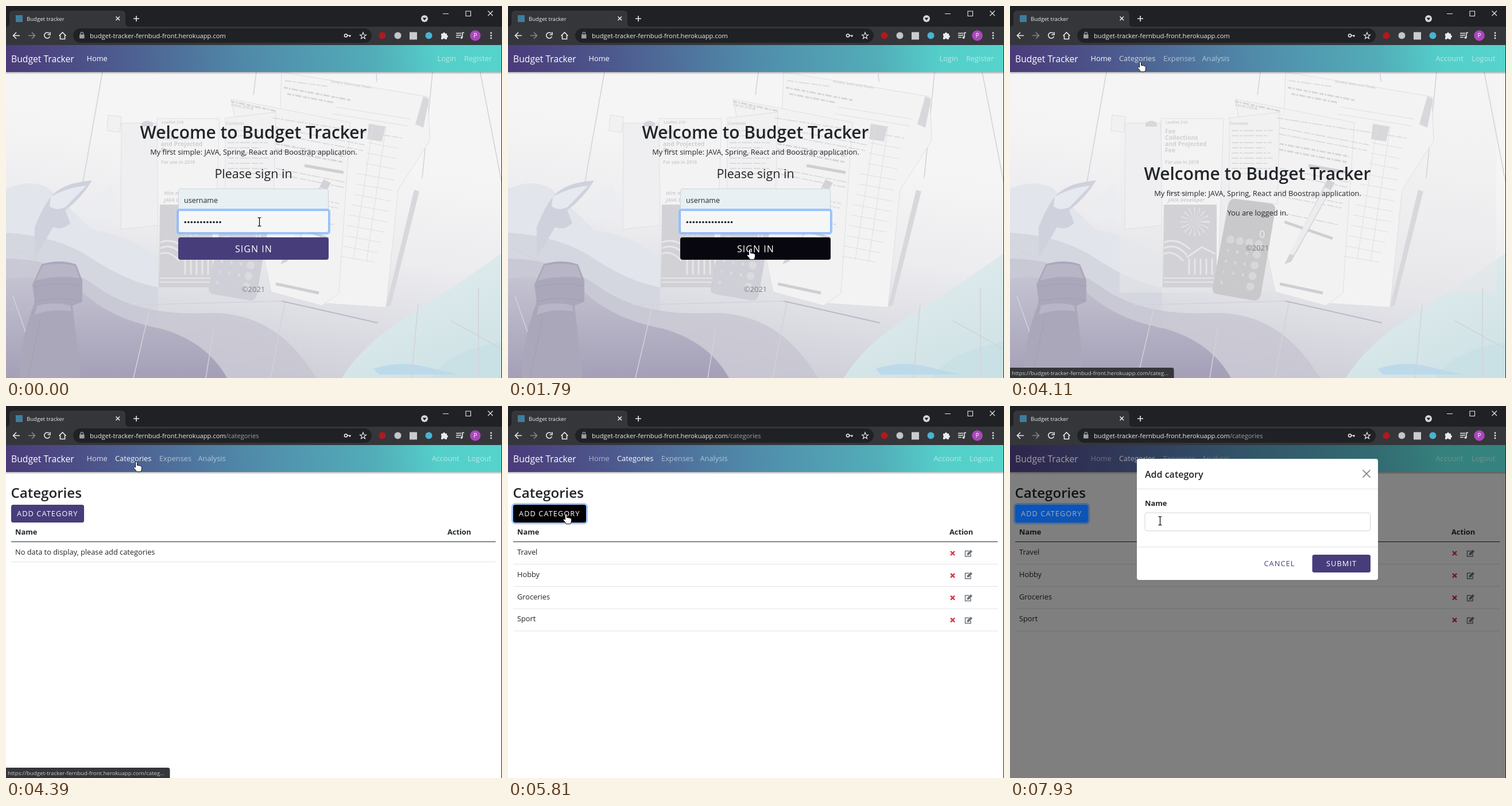
Write an HTML page that moves like this. It is 864x648 px and loops after 8000 ms.

```html
<!DOCTYPE html>
<html lang="en">
<head>
<meta charset="utf-8">
<title>Budget tracker</title>
<style>
html, body { margin: 0; width: 100%; height: 100%; overflow: hidden; background: #fff; }
svg { display: block; width: 864px; height: 648px; }
text { font: 12.8px "Open Sans", "Noto Sans", sans-serif; fill: #212529; white-space: pre; }
.mid { text-anchor: middle; }
.h1 { font-size: 29.9px; font-weight: 600; }
.h2 { font-size: 24.1px; font-weight: 600; }
.h3 { font-size: 21.5px; }
.h5 { font-size: 16px; font-weight: 600; }
.th { font-weight: 700; }
.btn { letter-spacing: 1.05px; fill: #fff; }
.nav text { fill: #fff; }
.dim { fill-opacity: .55; }
.copy { font-size: 13px; fill: #7b8087; }
.ui { fill: none; stroke: #e8eaed; stroke-width: 1.6; }
.print text { fill: #d0d0d3; font-weight: 700; }
.ring { fill: none; stroke: #86b7fe; stroke-width: 3; stroke-opacity: .75; }
</style>
</head>
<body>
<svg viewBox="0 0 864 648">
<defs>
  <linearGradient id="bar" gradientUnits="userSpaceOnUse" x1="0" y1="115" x2="846" y2="7">
    <stop offset="0" stop-color="#4a3a79"/><stop offset=".22" stop-color="#4d5a8e"/>
    <stop offset=".5" stop-color="#508baa"/><stop offset=".75" stop-color="#52adb8"/>
    <stop offset=".88" stop-color="#54cfca"/><stop offset="1" stop-color="#55d3cc"/>
  </linearGradient>
  <linearGradient id="desk" gradientUnits="userSpaceOnUse" x1="480" y1="250" x2="420" y2="660">
    <stop offset="0" stop-color="#f5f5f5"/><stop offset=".4" stop-color="#ececef"/>
    <stop offset=".7" stop-color="#dcdde3"/><stop offset="1" stop-color="#cbcbd5"/>
  </linearGradient>
  <linearGradient id="shade" x2="0" y2="1">
    <stop offset="0" stop-color="#c4c3d1"/><stop offset="1" stop-color="#a49fb7"/>
  </linearGradient>
  <linearGradient id="teal" x2=".5" y2="1">
    <stop offset="0" stop-color="#e6eef0"/><stop offset="1" stop-color="#d0e3e6"/>
  </linearGradient>
  <linearGradient id="pale" x2="0" y2="1">
    <stop offset="0" stop-color="#f5f5f5"/><stop offset="1" stop-color="#e6e6e9"/>
  </linearGradient>
  <linearGradient id="drop" x2="0" y2="1">
    <stop offset="0" stop-opacity=".28"/><stop offset="1" stop-opacity="0"/>
  </linearGradient>
</defs>

<g id="photo">
  <path fill="url(#desk)" d="M0 68H864V648H0Z"/>
  <path fill="#e2e5eb" d="M0 318Q45 300 75 318L150 390Q220 400 265 440V520H0Z"/>
  <path fill="#d5d7e0" d="M0 395Q90 400 150 440T265 490V560H0Z"/>
  <path fill="#c5c4d1" fill-opacity=".7" d="M0 440Q90 440 160 490T350 535T540 648H0Z"/>
  <path fill="url(#shade)" d="M0 475Q60 465 130 495Q180 545 270 562Q350 585 385 648H0Z"/>
  <path fill="url(#teal)" d="M585 648Q620 590 700 540T864 430V648Z"/>
  <path fill="#c9e1e4" d="M740 648Q770 600 864 585V648Z"/>
  <path fill="#bcdaea" d="M640 632Q690 615 745 632L790 642H650Z"/>
  <path id="wash" fill="url(#pale)" fill-opacity=".6" d="M191 115H847V499H191Z"/>
  <path fill="none" stroke="#d2d2d9" stroke-width="1.5" d="M168 115L130 330M436 115L431 155M645 118L646 132M743 115L725 300M826 115L864 310M252 520L222 648M362 560L348 648M486 515L461 648M718 520L706 648M215 521L480 514L648 552M0 418L56 445M12 505L40 585M775 548L864 598M823 490V648"/>
  <path stroke="#bbbac6" stroke-width="2" d="M480 514L648 552"/>
  <g stroke="#dfdfe2">
    <path fill="#f3f3f3" d="M480 115L735 158L738 235L683 320L662 525L555 518L467 480Z"/>
    <path fill="#f2f2f3" d="M392 162L600 203L580 500L550 522L462 498Z"/>
    <path fill="#f1f1f2" d="M382 195L470 185L466 345L382 335Z"/>
    <path fill="#efeff1" d="M201 204H262L272 381L200 389Z"/>
    <path fill="#f3f3f3" d="M263 196H372L362 490H266Z"/>
    <path fill="#f1f1f2" d="M178 190L201 193L198 220L176 217Z"/>
  </g>
  <path fill="#d8d8dc" d="M727 157L737 162L727 212L713 206ZM632 205L661 210L655 236L629 232ZM711 320L720 323L670 522L662 524ZM236 204Q246 196 256 204V210H236Z"/>
  <g fill="none" stroke="#d6d6d9">
    <path stroke-width="3" stroke-dasharray="7 2 3 2 11 3" d="M392 166L470 183M484 142L600 164M490 153L570 168M470 240L590 262M469 250L587 272"/>
    <path stroke-width="1.5" stroke-dasharray="12 2 5 2 18 3" d="M486 130L560 140M465 195L690 230M470 212L625 242M469 223L622 252M470 283L590 307M470 292L588 316M470 322L580 344M470 331L578 352M470 360L572 381M386 217H458M386 226H450M386 238H456M386 247H444M386 256H454M386 265H458M386 274H450M386 283H455M386 292H448"/>
    <path stroke="#dfdfe2" d="M575 176L704 197M570 188L700 209M630 238L684 248M628 256L681 266M626 274L678 284M612 292L676 303M610 310L673 321M606 328L670 340M602 346L667 358M598 364L664 376M594 382L660 394M590 400L654 412M586 418L648 430M582 436L642 446M640 205L605 442M662 209L628 446"/>
    <path stroke="#cfcfd3" stroke-width="5" d="M520 278L588 290M478 376L562 405M470 484L545 500"/>
  </g>
  <g class="print">
    <text x="271" y="205" style="font-size:7px">Leaflet 210</text>
    <text x="270" y="222" style="font-size:10.5px">Fee</text>
    <text x="270" y="233" style="font-size:10.5px">Collections</text>
    <text x="270" y="244" style="font-size:10.5px">and Projected</text>
    <text x="270" y="255" style="font-size:10.5px">Fee</text>
    <text x="270" y="275" style="font-size:8px">For use in 2019</text>
    <text x="383" y="207" style="font-size:7px">Contents</text>
    <text x="392" y="174" transform="rotate(11 392 174)" style="font-size:7px">Form 210-B</text>
    <text x="566" y="133" transform="rotate(9 566 133)" style="font-size:6px">Sundry Sums and Totals</text>
    <text x="275" y="329" style="font-size:9px;font-style:italic">Hire me</text>
    <text x="275" y="341" style="font-size:9px;font-style:italic">JAVA Developer</text>
  </g>
  <path fill="#d2d2d6" d="M268 346H360V490H266Z"/>
  <g fill="none" stroke="#e6e6e8">
    <circle cx="322" cy="376" r="13" stroke-width="25" stroke-dasharray="1 4"/>
    <path stroke-width="3" d="M268 412Q290 402 314 424M268 422Q290 412 308 434M268 432Q284 424 302 444M308 438L334 420L358 432M312 440V468M322 440V468M332 440V468M342 440V468M352 440V468"/>
    <path stroke-width="2" d="M268 474H360M268 481H360"/>
  </g>
  <path fill="#d3d3d7" d="M553 302L566 308L490 445L478 450Z"/>
  <path fill="#ececee" d="M548 316L558 320L494 434L486 432Z"/>
  <path id="calc" d="M392 336L454 344Q463 346 462 355L437 503Q434 514 425 513L361 502Q352 500 353 491L380 346Q383 335 392 336Z"/>
  <g fill="#e6e6e8">
    <text x="434" y="404" style="font-size:18px;fill:#eee">0</text>
    <g id="keys"></g>
  </g>
  <path fill="#cfd1dc" d="M50 385Q66 345 82 328Q104 307 150 304Q132 334 103 356L112 378Q98 392 82 385L50 440Z"/>
  <path fill="#e6e9ef" d="M78 332Q110 315 140 313L104 350Q88 358 76 349Z"/>
  <path fill="#ebedf0" d="M134 352L183 309L196 385L176 362L150 376Z"/>
  <path fill="#aba7bb" d="M62 450Q92 440 122 450L133 478V515L116 522L130 648H24Q22 590 50 516L46 485Z"/>
  <path fill="#b8b5c7" d="M64 452Q92 446 120 452L128 474Q90 468 52 478ZM54 522Q86 514 112 522L114 532Q80 526 50 538Z"/>
  <path fill="none" stroke="#98949f" stroke-opacity=".5" d="M48 490Q90 478 132 488M48 515Q90 504 132 514M60 545L38 648"/>
</g>

<g id="login">
  <text class="h1 mid" x="431" y="231">Welcome to Budget Tracker</text>
  <text class="mid" x="431.5" y="259">My first simple: JAVA, Spring, React and Boostrap application.</text>
  <text class="h3 mid" x="431" y="300">Please sign in</text>
  <path fill="#e8f0f3" stroke="#ced4da" d="M300.5 357V322Q300.5 318.5 304 318.5H558Q561.5 318.5 561.5 322V357Z"/>
  <text x="310" y="343" style="font-size:12.5px">username</text>
  <path fill="#f6f6f6" stroke="#ced4da" d="M300.5 356.5H561.5V391Q561.5 394.5 558 394.5H304Q300.5 394.5 300.5 391Z"/>
  <g id="fieldRing">
    <rect class="ring" x="298.5" y="354.5" width="265" height="42" rx="4"/>
    <rect x="300.5" y="356.5" width="261" height="38" rx="2" fill="none" stroke="#86b7fe"/>
  </g>
  <path id="dots" fill="none" stroke="#212529" stroke-width="3.7" stroke-linecap="round" stroke-dasharray="0 5.52"/>
  <rect id="signRing" class="ring" x="298.5" y="401.5" width="265" height="42" rx="5"/>
  <rect id="sign" x="300" y="403" width="262" height="39" rx="4"/>
  <text class="btn mid" x="431.5" y="429" style="font-size:16px">SIGN IN</text>
  <text class="copy mid" x="431" y="498">©2021</text>
</g>

<g id="home">
  <text class="h1 mid" x="431" y="303">Welcome to Budget Tracker</text>
  <text class="mid" x="431.5" y="331">My first simple: JAVA, Spring, React and Boostrap application.</text>
  <text class="mid" x="431.5" y="365">You are logged in.</text>
  <text class="copy mid" x="431" y="426">©2021</text>
</g>

<g id="cats">
  <path fill="#fff" d="M0 68H864V648H0Z"/>
  <text class="h2" x="8.5" y="160">Categories</text>
  <text class="th" x="16" y="224">Name</text>
  <text class="th" x="769" y="224">Action</text>
  <path stroke="#212529" d="M9 236.5H853"/>
  <g id="empty">
    <text x="16" y="259">No data to display, please add categories</text>
    <path stroke="#dee2e6" d="M9 271.5H853"/>
  </g>
  <g id="rows"></g>
</g>

<g class="nav">
  <path fill="url(#drop)" d="M0 115H864V119H0Z"/>
  <path fill="url(#bar)" d="M0 68H864V115H0Z"/>
  <text x="9" y="98" style="font-size:15.7px">Budget Tracker</text>
  <text id="navHome" x="140.5" y="96">Home</text>
  <g id="guest" class="dim"><text x="751.5" y="96">Login</text><text x="798" y="96">Register</text></g>
  <g id="member" class="dim">
    <text id="navCats" x="190" y="96">Categories</text>
    <text x="267" y="96">Expenses</text>
    <text x="334.5" y="96">Analysis</text>
    <text x="741.5" y="96">Account</text>
    <text x="804" y="96">Logout</text>
  </g>
</g>

<g id="shadow">
  <path fill-opacity=".38" d="M0 68H864V115H0Z"/>
  <path fill-opacity=".5" d="M0 115H864V648H0Z"/>
</g>

<g id="addBtn">
  <rect id="addRing" class="ring" x="7.5" y="170.5" width="130" height="34" rx="5"/>
  <rect id="add" x="9" y="172" width="127" height="31" rx="3.5"/>
  <text id="addText" class="btn" x="19" y="192">ADD CATEGORY</text>
</g>

<g id="modal">
  <rect x="221" y="92" width="420" height="211" rx="4" fill="#fff"/>
  <path stroke="#dee2e6" d="M221 144.5H641M221 245.5H641"/>
  <text class="h5" x="235" y="125">Add category</text>
  <path stroke="#777" stroke-width="1.6" d="M614.5 111.5L627.5 124.5M627.5 111.5L614.5 124.5"/>
  <text class="th" x="235" y="174">Name</text>
  <rect x="235" y="186" width="392.5" height="31.5" rx="3.5" fill="#fff" stroke="#ced4da"/>
  <text class="btn" x="442.5" y="279" style="fill:#483d7b">CANCEL</text>
  <rect x="526.5" y="259" width="101.5" height="31" rx="3.5" fill="#483d7b"/>
  <text class="btn" x="551" y="279">SUBMIT</text>
</g>

<g id="status">
  <path fill="#35363a" d="M0 630H282Q285.5 630 285.5 634V648H0Z"/>
  <text x="3" y="643" style="font-size:9.66px;fill:#c6c9cd">https://budget-tracker-fernbud-front.herokuapp.com/categ...</text>
</g>

<g id="browser">
  <path fill="#202124" d="M0 0H864V68H0ZM863 68H864V648H863Z"/>
  <path fill="#35363a" d="M0 36Q6 36 6 30V15Q6 8 13 8H201Q208 8 208 15V30Q208 36 214 36H864V68H0Z"/>
  <rect x="17" y="16" width="12" height="12" fill="#3f7d9c"/>
  <text x="36" y="25.5" style="font-size:9.6px;fill:#e8eaed">Budget tracker</text>
  <path class="ui" d="M191.5 18.5L198 25M198 18.5L191.5 25M222 22H232M227 17V27"/>
  <circle cx="729" cy="22" r="6" fill="#d5d7da"/><path fill="#202124" d="M725.5 20.5H732.5L729 25Z"/>
  <path class="ui" style="stroke-width:1.1" d="M761 13.5H771M801 9H809.5V17.5H801ZM839.5 8.5L848 17M848 8.5L839.5 17"/>
  <path class="ui" d="M24 51.5H13M18 46L12.5 51.5L18 57"/>
  <path class="ui" style="stroke:#85878b" d="M39 51.5H50M45 46L50.5 51.5L45 57"/>
  <path class="ui" d="M75.5 47.8A5 5 0 1 0 76.5 53M77 45.5V50H72.5"/>
  <path class="ui" d="M92.5 52L98.5 46L104.5 52M94.5 51V57.5H102.5V51"/>
  <rect x="117" y="39" width="520" height="25" rx="12.5" fill="#202124"/>
  <path fill="#9aa0a6" d="M128 49.5H136.5V56.5H128Z"/>
  <path fill="none" stroke="#9aa0a6" stroke-width="1.3" d="M130 49.5V48A2.3 2.3 0 0 1 134.6 48V49.5"/>
  <text x="146" y="55.5" style="font-size:11.18px;fill:#e8eaed">budget-tracker-fernbud-front.herokuapp.com<tspan id="path" fill="#9aa0a6">/categories</tspan></text>
  <path class="ui" d="M595 51.5H601M599 51.5V54"/><circle class="ui" cx="592" cy="51.5" r="2.5"/>
  <path class="ui" style="stroke-width:1.2" d="M622 46L623.5 50L627.5 50.2L624.3 52.8L625.4 56.8L622 54.5L618.6 56.8L619.7 52.8L616.5 50.2L620.5 50Z"/>
  <circle cx="655.5" cy="51.5" r="6" fill="#b3181d"/>
  <circle cx="682.5" cy="51.5" r="6" fill="#c3c5c8"/>
  <rect x="703" y="45.5" width="13" height="13" fill="#c9cbcd"/>
  <circle cx="736.5" cy="51.5" r="6" fill="#47b4d0"/>
  <path fill="#e8eaed" d="M758 48H761A2 2 0 1 1 765 48H768V51A2 2 0 1 1 768 55V58H764.5A1.8 1.8 0 0 0 761 58H758V54.5A1.8 1.8 0 0 0 758 51.5Z"/>
  <path class="ui" d="M784 47.5H793M784 51H793M784 54.5H790M795 54.5V46.5H798"/><circle cx="793.5" cy="55" r="2" fill="#e8eaed"/>
  <circle cx="817.5" cy="51.5" r="9.3" fill="#ab47bc"/><text class="mid" x="817.5" y="55" style="font-size:10px;fill:#fff">P</text>
  <path fill="none" stroke="#e8eaed" stroke-width="2.8" stroke-linecap="round" stroke-dasharray="0 4.5" d="M845 47V56.1"/>
</g>

<path id="cursor" stroke-linejoin="round"/>
</svg>
<script>
const $ = id => document.getElementById(id);
const LOOP = 8000;
const set = (id, name, value) => $(id).setAttribute(name, value);
const show = (id, on) => { $(id).style.display = on ? '' : 'none'; };
// Latest step whose time has been reached
const at = (steps, t) => steps.filter(s => s[0] <= t).pop().slice(1);

const shapes = {
  beam: 'M-3-7.5Q0-7.5 0-6Q0-7.5 3-7.5M0-6V6M-3 7.5Q0 7.5 0 6Q0 7.5 3 7.5',
  arrow: 'M0 0V14L3.3 11L5.5 16L7.8 15L5.6 10H10Z',
  hand: 'M-2 1.5Q-2 0-.5 0T1 1.5V6.5Q2.5 5.5 4 7Q5.5 6 6.5 7.5Q9 7 9 9V12Q9 15 7 17.5H0Q-1 15-4.5 11.5Q-6 9.5-4 9Q-3 9-2 10Z'
};
const pointer = [
  [0, 'beam', 441, 376], [1550, 'hand', 430, 409], [1670, 'hand', 425, 418],
  [1790, 'hand', 421, 424], [1940, 'hand', 421, 427], [2580, 'beam', 421, 427],
  [3210, 'arrow', 446, 372], [3330, 'arrow', 472, 262], [3450, 'arrow', 401, 183],
  [3600, 'arrow', 288, 136], [3750, 'hand', 246, 101], [3870, 'hand', 232, 97],
  [3990, 'hand', 227, 97], [4770, 'arrow', 206, 118], [4890, 'arrow', 176, 150],
  [5010, 'arrow', 153, 170], [5160, 'hand', 118, 182], [5290, 'hand', 104, 187],
  [5430, 'hand', 101, 188], [5930, 'arrow', 101, 187], [7390, 'arrow', 114, 191],
  [7540, 'arrow', 161, 193], [7690, 'arrow', 205, 203], [7810, 'beam', 248, 202],
  [7930, 'beam', 261, 200]
];
const signFill = [[0, '#483d7b'], [1670, '#28224a'], [1790, '#08070f'], [1940, '#000']];
const focus = [[0, 0], [2090, .35], [2210, .75], [2330, 1]];
const addFill = [[0, '#483d7b'], [5160, '#3b3266'], [5290, '#17142a'], [5430, '#000'],
  [5930, '#04090f'], [6080, '#0b54b8']];
const homeGlow = [[0, 1], [4390, .8], [4510, .65], [4630, .55]];
const catsGlow = [[0, .55], [3750, .6], [3870, .68], [3990, .75], [4390, .95], [4510, 1]];

$('rows').innerHTML = ['Travel', 'Hobby', 'Groceries', 'Sport'].map((name, i) => `
  <g transform="translate(0 ${i * 38.8})">
    <text x="16" y="259">${name}</text>
    <path stroke="#dee2e6" d="M9 275.5H853"/>
    <path stroke="#dc3545" stroke-width="2.4" d="M771 253L778 260M778 253L771 260"/>
    <path fill="none" stroke="#6c757d" stroke-width="1.5" d="M803 252.5H796.5V262H806V257.5"/>
    <path fill="#6c757d" d="M800 256.5L806 250.5L809 253.5L803 259.5L799.5 260Z"/>
  </g>`).join('');

let keys = '';
for (let r = 0; r < 5; r++) for (let c = 0; c < 4; c++) {
  const x = 384 + c * 16.5 - r * 3.7, y = 407 + c * 2.6 + r * 18.5;
  keys += r && c < 3
    ? `<text x="${x - 3}" y="${y + 3}" style="font-size:8px;fill:#f1f1f2">${r < 4 ? 10 - 3 * r + c : '0 .'[c]}</text>`
    : `<circle cx="${x}" cy="${y}" r="7" fill-opacity=".5"/>`;
}
$('keys').innerHTML = keys;

function draw(t) {
  const home = t >= 2580, cats = t >= 4390, modal = t >= 5930;
  show('login', !home);
  show('guest', !home);
  show('member', home);
  show('home', home && !cats);
  show('wash', home);
  show('cats', cats);
  show('addBtn', cats);
  show('path', cats);
  show('empty', t < 4510);
  show('rows', t >= 4510);
  show('status', t >= 3870 && t < 5160);
  show('modal', modal);
  show('shadow', modal);

  const count = 12 + [400, 650, 900].filter(k => t >= k).length;
  set('dots', 'd', `M312.3 376.5h${(count - 1) * 5.52 + .1}`);
  const f = at(focus, t)[0];
  set('fieldRing', 'opacity', 1 - f);
  set('signRing', 'opacity', f);
  set('sign', 'fill', at(signFill, t)[0]);
  set('calc', 'fill', home ? '#c9c9cb' : '#cfcfd7');

  set('navHome', 'fill-opacity', at(homeGlow, t)[0]);
  set('navCats', 'fill-opacity', at(catsGlow, t)[0]);
  set('add', 'fill', at(addFill, t)[0]);
  set('addRing', 'opacity', t < 5810 ? 0 : 1);
  $('addRing').style.stroke = modal ? '#3f659b' : '';
  $('addText').style.fill = modal ? '#a5abb5' : '';

  const [kind, x, y] = at(pointer, t), beam = kind === 'beam';
  set('cursor', 'd', shapes[kind]);
  set('cursor', 'transform', `translate(${x + .5} ${y})`);
  set('cursor', 'fill', beam ? 'none' : '#fff');
  set('cursor', 'stroke', '#000');
  set('cursor', 'stroke-width', beam ? 1.2 : .9);
}

const start = performance.now();
function tick() {
  draw((performance.now() - start) % LOOP);
  requestAnimationFrame(tick);
}
tick();
</script>
</body>
</html>
```
